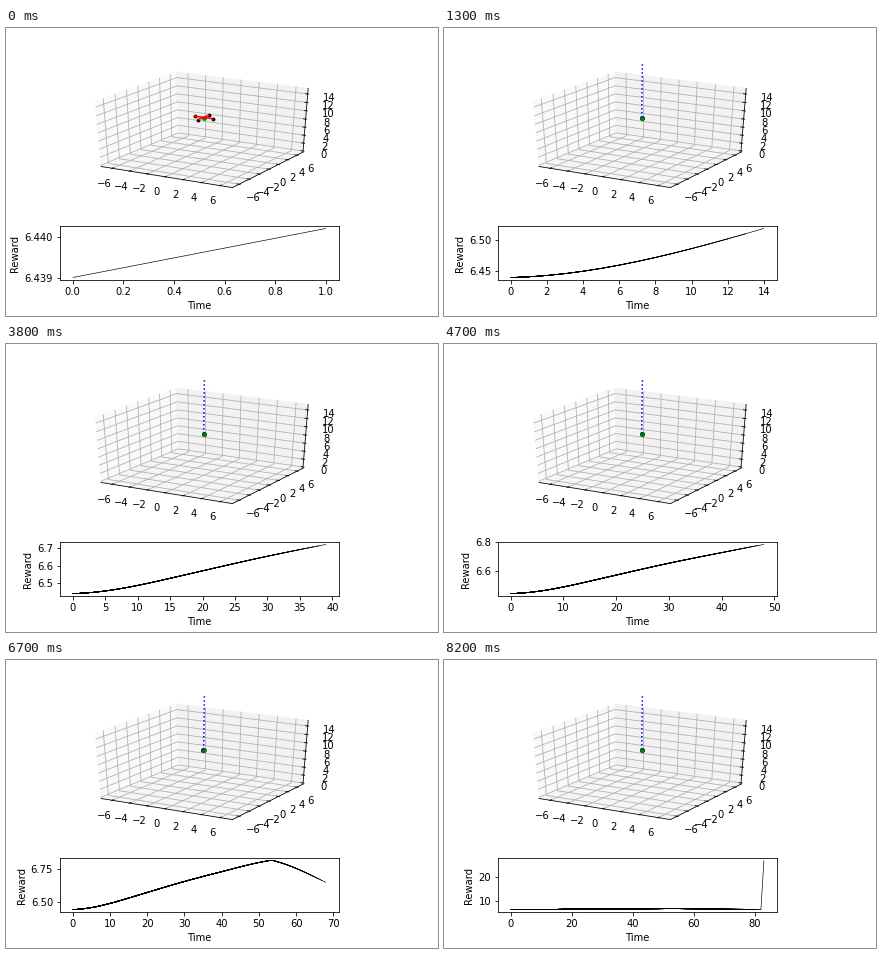
Write a matplotlib script that moves like this. It is 432 px wide and 288 px high and loops after 8300 ms.

```python
import numpy as np
import matplotlib.pyplot as plt
from matplotlib.animation import FuncAnimation
from matplotlib.collections import LineCollection

W, H, DPI = 432, 288, 72
STEPS = 83
DIST = 10
VIEW = (-0.095, 0.09)
EDGE = 0.5 + 1 / 48      # half size of the box, in unit-cube coordinates
LABEL_GAP = 0.111
TICK_OUT, TICK_IN = 1 / 120, 1 / 60

plt.rcParams["font.family"] = "DejaVu Sans"
plt.rcParams["font.size"] = 10
fig = plt.figure(figsize=(W / DPI, H / DPI), dpi=DPI, facecolor="white")


def pixel_axes(left, top, width, height):
    return fig.add_axes([left / W, 1 - (top + height) / H, width / W, height / H])


# Camera: azimuth -60, elevation 30
az, el = np.radians([-60, 30])
toward = np.array([np.cos(az) * np.cos(el), np.sin(az) * np.cos(el), np.sin(el)])
right = np.array([-np.sin(az), np.cos(az), 0])
up = np.cross(toward, right)


def project(points):
    """Perspective view of unit-cube points centred on the origin."""
    p = np.atleast_2d(np.asarray(points, float))
    depth = DIST - p @ toward
    return p @ right / depth, p @ up / depth


def unit(points):
    """World (x, y in -7..7, z in 0..15) to unit-cube coordinates."""
    p = np.atleast_2d(np.asarray(points, float))
    return np.column_stack([p[:, 0] / 14, p[:, 1] / 14, p[:, 2] / 15 - 0.5])


scene = pixel_axes(59.4, 35.5, 269.2, 132.2)
scene.set(xlim=VIEW, ylim=VIEW)
scene.axis("off")


def polyline(points, color, lw=0.8, z=2):
    scene.plot(*project(points), color=color, lw=lw, zorder=z)


def tick_label(point, value):
    x, y = project(point)
    text = str(value).replace("-", "\u2212")
    scene.text(x[0], y[0], text, ha="center", va="top")


def draw_box():
    e = EDGE
    panes = [
        ([(-e, -e, -e), (-e, e, -e), (-e, e, e), (-e, -e, e)], "0.975"),
        ([(-e, e, -e), (e, e, -e), (e, e, e), (-e, e, e)], "0.95"),
        ([(-e, -e, -e), (e, -e, -e), (e, e, -e), (-e, e, -e)], "0.9625"),
    ]
    for corners, shade in panes:
        scene.fill(*project(corners), fc=shade, ec=shade, lw=1, zorder=0)

    grid = "#b0b0b0"
    out, gap = e + TICK_OUT, e + LABEL_GAP
    inner = e - TICK_IN
    for v in range(-6, 7, 2):
        q = v / 14
        polyline([(q, e, e), (q, e, -e), (q, -e, -e)], grid, z=1)
        polyline([(-e, q, e), (-e, q, -e), (e, q, -e)], grid, z=1)
        polyline([(q, -out, -e), (q, -inner, -e)], "black")
        polyline([(out, q, -e), (inner, q, -e)], "black")
        tick_label((q, -gap, -gap), v)
        tick_label((gap, q, -gap), v)
    for v in range(0, 15, 2):
        q = v / 15 - 0.5
        polyline([(-e, -e, q), (-e, e, q), (e, e, q)], grid, z=1)
        polyline([(out, e, q), (inner, e, q)], "black")
        tick_label((gap, gap, q), v)

    polyline([(-e, -e, -e), (e, -e, -e)], "black")
    polyline([(e, -e, -e), (e, e, -e)], "black")
    polyline([(e, e, -e), (e, e, e)], "black")


draw_box()

start_dot, = scene.plot([], [], "o", color="black", ms=5, mew=0, zorder=3)
goal_dot, = scene.plot(*project(unit([0, 0, 9.75])), "o", color="green",
                       ms=4.8, mew=0, zorder=4)
trail, = scene.plot([], [], ":", color="blue", lw=1.5, zorder=5)
motors, = scene.plot([], [], "o", color="black", ms=3.8, mew=0, zorder=6)
arms = [scene.plot([], [], color="red", lw=1.6, zorder=7)[0] for _ in range(2)]

ARM_X = np.array([(-1, 0, 0), (1, 0, 0)])
ARM_Y = np.array([(0, -1, 0), (0, 1, 0)])

# Reward curve through a few (time, value, slope) knots
KNOTS = np.array([
    (0, 6.43901, 0.0007), (14, 6.518, 0.0085), (27, 6.629, 0.0083),
    (39, 6.721, 0.0072), (53, 6.814, 0.0045), (55, 6.804, -0.008),
    (68, 6.646, -0.014), (82, 6.47, -0.011),
])
FINAL_REWARD = 26.9


def hermite(t):
    times, values, slopes = KNOTS.T
    i = np.clip(np.searchsorted(times, t, side="right") - 1, 0, len(times) - 2)
    h = times[i + 1] - times[i]
    s = (t - times[i]) / h
    return ((1 + 2 * s) * (1 - s) ** 2 * values[i]
            + s * (1 - s) ** 2 * h * slopes[i]
            + s * s * (3 - 2 * s) * values[i + 1]
            + s * s * (s - 1) * h * slopes[i + 1])


time = np.arange(STEPS + 1)
reward = hermite(time.astype(float))
reward[-1] = FINAL_REWARD
curve = np.column_stack([time, reward])

chart = pixel_axes(54, 198, 278.6, 54)
chart.set(xlabel="Time", ylabel="Reward")
history = LineCollection([], colors="black", linewidths=0.65)
chart.add_collection(history, autolim=False)


def padded(values):
    lo, hi = values.min(), values.max()
    pad = 0.05 * (hi - lo)
    return lo - pad, hi + pad


def update(n):
    z = min(10 + 0.1 * n * n, 30)
    centre = np.array([0.0065 * (z - 10), 0, z])
    trail.set_data(*project(unit([(0, 0, 10), centre])))
    motors.set_data(*project(unit(np.vstack([ARM_X, ARM_Y]) + centre)))
    for line, arm in zip(arms, (ARM_X, ARM_Y)):
        line.set_data(*project(unit(arm + centre)))

    x, y = project(unit([0, 0, 9.8]))
    start_dot.set_data(x + (np.cos(2 * n) - 1) * 0.0002, y)
    start_dot.set_visible(n > 0)

    # Every step draws the whole curve again, so older parts grow darker
    history.set_segments([curve[:k] for k in range(2, n + 3)])
    chart.set_xlim(padded(time[:n + 2]))
    chart.set_ylim(padded(reward[:n + 2]))
    return []


anim = FuncAnimation(fig, update, frames=STEPS, interval=100,
                     init_func=lambda: update(0), repeat=True, repeat_delay=0)
plt.show()
```
